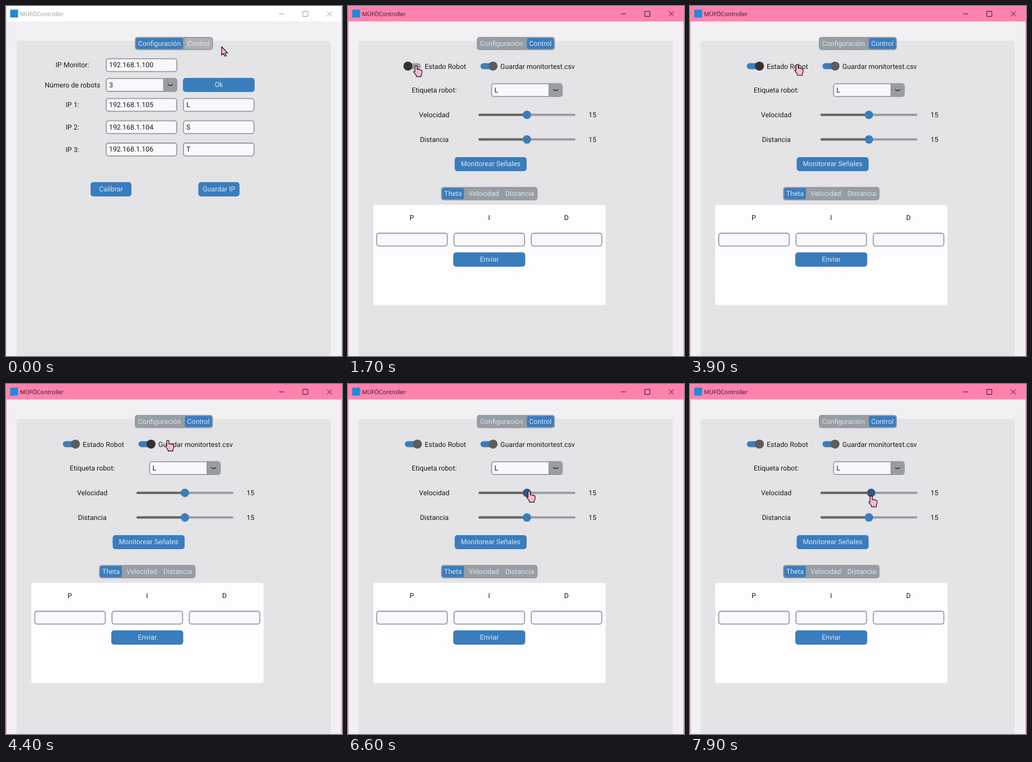
An HTML page that plays this animation: 600x623 px, repeating every 8000 ms.

```html
<!DOCTYPE html>
<html lang="es">
<head>
<meta charset="utf-8">
<title>Controller</title>
<style>
html, body { margin: 0; width: 100%; height: 100%; overflow: hidden; background: #f2f0f2; }
svg { display: block; width: 600px; height: 623px; }
text { font: 12.35px Roboto, sans-serif; text-rendering: geometricPrecision; }
.title { font: 10.3px "Open Sans", "Noto Sans", sans-serif; }
</style>
</head>
<body>
<svg id="stage" viewBox="0 0 600 623" xmlns="http://www.w3.org/2000/svg"></svg>
<script>
const BLUE = '#3a7dbd', DARK_BLUE = '#325882', GREY = '#979da2', LIGHT = '#dce4ee', INK = '#1a1a1a';
const PANEL = '#e4e3e5', FIELD = '#f9f8fa', KNOB = '#5c5c5c', KNOB_HOVER = '#333';

// Markup helpers; boxes are given by their left, top, right and bottom edges.
const box = (l, t, r, b, fill, radius = 5, extra = '') =>
  `<rect x="${l}" y="${t}" width="${r - l}" height="${b - t}" rx="${radius}" fill="${fill}" ${extra}/>`;
const label = (x, y, str, fill = INK, anchor = 'middle') =>
  `<text x="${x}" y="${y + 4.3}" fill="${fill}" text-anchor="${anchor}">${str}</text>`;
const button = (l, t, r, b, str) => box(l, t, r, b, BLUE) + label((l + r) / 2, (t + b) / 2 - .4, str, LIGHT);
const entry = (l, y, str = '') =>
  box(l + .9, y - 11.4, l + 126.9, y + 11.4, FIELD, 4.2, `stroke="${GREY}" stroke-width="1.8"`) +
  label(l + 6, y - .3, str, INK, 'start');
const combo = (l, y, str) => entry(l, y, str) +
  `<path d="M${l + 102.5} ${y - 12.3}h20.3a5 5 0 0 1 5 5v14.6a5 5 0 0 1 -5 5h-20.3z" fill="${GREY}"/>
   <path d="M${l + 111.3} ${y - .9}q4 3.6 8 0" fill="none" stroke="#222" stroke-width="1.5" stroke-linecap="round"/>`;
const toggle = (l, id) => box(l, 101.7, l + 28.5, 112.4, BLUE, 5.3, `id="${id}Track"`) +
  `<circle id="${id}Knob" cx="${l + 22.5}" cy="107" r="8" fill="${KNOB}"/>`;
const slider = (y, id) => box(233, y - 2, 406, y + 2, GREY, 2) +
  box(233, y - 2, 319.5, y + 2, '#666', 2, `id="${id}Bar"`) +
  `<circle id="${id}Knob" cx="319.5" cy="${y}" r="7.5" fill="${BLUE}"/>` + label(436.5, y, '15');

const configPage = () =>
  label(118.5, 105, 'IP Monitor:') + entry(178, 105.2, '192.168.1.100') +
  label(118.8, 140.6, 'Número de robots') + combo(178, 140.6, '3') +
  button(316, 128, 444, 153, 'Ok') +
  [['105', 'L', 176], ['104', 'S', 215.7], ['106', 'T', 255.4]].map(([ip, tag, y], i) =>
    label(118.5, y, `IP ${i + 1}:`) + entry(178, y, '192.168.1.' + ip) + entry(316, y, tag)).join('') +
  button(151, 313.5, 224, 339, 'Calibrar') + button(343.5, 313.5, 417, 339, 'Guardar IP');

const controlPage = () =>
  toggle(101.5, 'state') + label(137, 107.2, 'Estado Robot', INK, 'start') +
  toggle(236.5, 'save') + label(272, 107.2, 'Guardar monitortest.csv', INK, 'start') +
  label(154, 149.8, 'Etiqueta robot:') + combo(255.5, 149.7, 'L') +
  label(154, 193.8, 'Velocidad') + slider(193.8, 'speed') +
  label(154, 237.8, 'Distancia') + slider(237.6, 'dist') +
  button(190.5, 269, 319, 294, 'Monitorear Señales') +
  box(45, 354, 460, 532.5, '#fdfcfe', 4) +
  box(166, 322, 338.5, 346, GREY) + box(168, 324, 207, 344, BLUE, 3) +
  label(187.5, 333.9, 'Theta', LIGHT) + label(242.5, 333.9, 'Velocidad', LIGHT) + label(306.5, 333.9, 'Distancia', LIGHT) +
  ['P', 'I', 'D'].map((c, i) => label(114 + 138 * i, 377, c) + entry(50.4 + 138 * i, 415.9)).join('') +
  button(188, 438.5, 316.5, 464, 'Enviar');

const CURSOR = 'fill="#fdb8d0" stroke="#1d1117" stroke-width="1.2" stroke-linejoin="round"';
document.getElementById('stage').innerHTML =
  box(0, 0, 600, 623, '#f2f0f2', 0) +
  box(0, 0, 600, 27.5, '#fff', 0, 'id="titleBar"') +
  '<path id="frame" d="M.5 0V623M599.5 0V623" stroke-width="1"/>' +
  box(7.5, 6.5, 21.5, 20.5, '#1a8be0', 0) +
  `<g id="caption"><text class="title" x="25" y="18.3">MÜFÖ</text><text class="title" x="55" y="18.3">Controller</text></g>
   <path id="winButtons" d="M487.5 14h9M530 9.5h9v9h-9zM573 9.5l9 9M582 9.5l-9 9" fill="none" stroke-width="1"/>` +
  box(19, 62, 580, 640, PANEL) +
  box(230, 55, 369.5, 78.5, GREY) +
  box(232, 57, 316, 76.5, BLUE, 3, 'id="configTab"') + box(319.5, 57, 367.5, 76.5, BLUE, 3, 'id="controlTab"') +
  label(274, 66.8, 'Configuración', LIGHT) + label(343.5, 66.8, 'Control', LIGHT) +
  `<g id="config">${configPage()}</g><g id="control">${controlPage()}</g>
   <path id="arrow" ${CURSOR} d="M0 0V15L3.4 12L5.8 17L8.3 15.9L6.1 11H10.8Z"/>
   <path id="hand" ${CURSOR} d="M-2 2Q-2 .4 0 .4Q2 .4 2 2V7Q4 5.6 5.2 7.4Q7.2 6.2 8.2 8.2Q10.4 7.4 10.6 9.9V13Q10.3 15.5 9 17V19.7H.5V17.6L-4 11.8Q-4.6 9.4 -2 10.7Z"/>`;

const el = {};
document.querySelectorAll('[id]').forEach(node => el[node.id] = node);
const set = (id, attrs) => { for (const k in attrs) el[id].setAttribute(k, attrs[k]); };
const show = (id, on) => set(id, { visibility: on ? 'visible' : 'hidden' });

const LOOP = 8000, TICK = 100, DRAG_START = 6950;
// Pointer path: time, x, y
const POINTER = [
  [0, 385, 72.5], [500, 385, 72.5], [1200, 131, 106.5], [1300, 131, 106.5], [1400, 121.5, 106],
  [2900, 121.5, 106], [3000, 121.5, 106.7], [3500, 121.5, 106.7], [4400, 289, 99.7],
  [5000, 352, 106], [5900, 352, 106], [6600, 323.5, 190.6], [6900, 323.5, 190.6],
  [7100, 338, 193], [7500, 260, 198], [7800, 322.5, 199], [7900, 323.5, 199], [8000, 323.5, 199]
];

function pointerAt(t) {
  const i = POINTER.findIndex(p => p[0] > t);
  const [t0, x0, y0] = POINTER[i - 1], [t1, x1, y1] = POINTER[i];
  const u = (t - t0) / (t1 - t0), k = u * u * (3 - 2 * u);
  return [x0 + (x1 - x0) * k, y0 + (y1 - y0) * k];
}

function draw(now) {
  const t = Math.floor(now % LOOP / TICK) * TICK;
  const [x, y] = pointerAt(t);
  const active = t >= 500, stateOn = t >= 3000, dragging = t >= DRAG_START;
  const over = (l, top, r, b) => active && x >= l && x <= r && y >= top && y <= b;
  const overState = over(98, 96, 212, 119), overSave = over(234, 96, 407, 119);
  const overSpeed = dragging || over(230, 184, 408, 203);
  const onHand = overState || overSave || overSpeed;

  set('titleBar', { fill: active ? '#ff82ae' : '#fff' });
  set('frame', { stroke: active ? '#f58bb3' : '#c9c8ca' });
  set('caption', { fill: active ? '#2a1520' : '#999' });
  set('winButtons', { stroke: active ? '#2a1520' : '#999' });
  set('configTab', { fill: active ? GREY : BLUE });
  set('controlTab', { fill: !active ? '#b0b0b2' : t < 700 ? DARK_BLUE : BLUE });
  show('config', !active);
  show('control', active);

  set('stateTrack', { fill: stateOn ? BLUE : GREY });
  set('stateKnob', { cx: stateOn ? 124 : 107, fill: overState ? KNOB_HOVER : KNOB });
  set('saveKnob', { fill: overSave ? KNOB_HOVER : KNOB });
  const knobX = dragging ? x : 319.5;
  set('speedKnob', { cx: knobX, fill: overSpeed ? DARK_BLUE : BLUE });
  set('speedBar', { width: knobX - 233 });

  show('hand', onHand);
  show('arrow', !onHand);
  set(onHand ? 'hand' : 'arrow', { transform: `translate(${x} ${y})` });
}

function loop() {
  draw(performance.now() - start);
  requestAnimationFrame(loop);
}
const start = performance.now();
loop();
</script>
</body>
</html>
```
